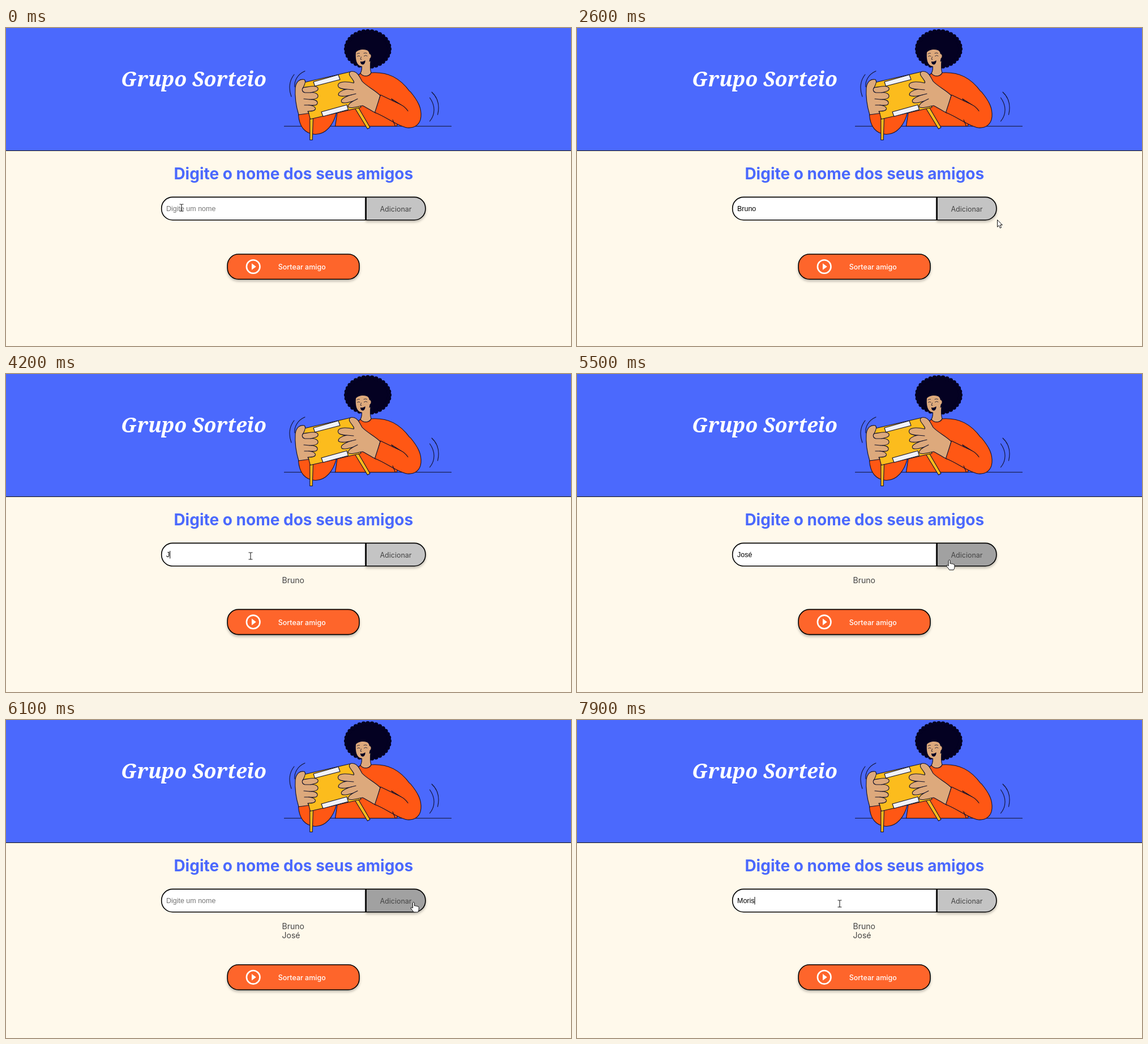
An HTML page for the animation above (8 s loop, 998 px wide and 561 px high).

```html
<!DOCTYPE html>
<html lang="pt-BR">
<head>
<meta charset="utf-8">
<title>Sorteio</title>
<style>
  html, body { margin: 0; width: 100%; height: 100%; overflow: hidden; background: #fff9eb; }
  svg { display: block; }
  text { font-family: Inter, sans-serif; font-size: 12.48px; white-space: pre; }
  .title { font: italic 700 35.7px "Noto Serif", serif; fill: #fff; }
  .heading { font-size: 28px; font-weight: 700; fill: #4b69fd; }
  .field { font-family: "Liberation Sans", Arial, sans-serif; }
  .item { font-size: 14.04px; fill: #444; }
  .box { stroke: #000; stroke-width: 1.6; }
  .raised { filter: drop-shadow(0 3px 2px rgba(0, 0, 0, .25)); }
  .ink { stroke: #10102a; stroke-width: 1.1; stroke-linejoin: round; stroke-linecap: round; }
  .line { fill: none; }
  .fine { stroke-width: .8; }
  .skin { fill: #dda97c; }
  .shirt { fill: #ff5714; }
  .wood { fill: #fcbc1d; }
  .paper { fill: #f1f2f8; }
  .hair { fill: #040122; }
</style>
</head>
<body>
<svg width="998" height="561" viewBox="0 0 998 561">
  <rect width="998" height="561" fill="#fff9eb"/>
  <rect width="998" height="216" fill="#4b69fd"/>
  <rect y="216" width="998" height="1" fill="#101010"/>
  <text class="title" x="203" y="103">Grupo Sorteio</text>

  <g class="ink">
    <path class="line" d="M491.500 173.300H786.500"/>
    <path class="line" d="M509 82C500 93 499 108 504 121M528 76C514 82 509 94 510 104"/>
    <path class="line" d="M752 113C764 124 766 138 762.500 153M748.500 123C758 136 759 152 748.500 164.500"/>
    <g id="hair" class="hair" stroke="none"></g>
    <path class="skin" d="M628 62C629 69 629 75 626 80C631 87 642 86 645 79C643 73 643 67 644 58Z"/>
    <path class="skin" stroke="none" d="M618 43C617 55 619 66 628 67.500C637 68 642 62 642.500 54C646 51 645 46 642 46C641 42 640 40 637 39C631 37 622 38 618 43Z"/>
    <path class="line fine" d="M620.500 50q2.500 -2 4.500 -.3M632.500 49.500q3 -2.500 5.500 -.2M620 45.500q2 -1.500 4.500 -1M632 44.500q3 -1.500 5.500 0M627.500 51l-1.500 4q1 1 2 .5"/>
    <path class="hair" stroke="none" d="M626 59C629 60 632 59 634.500 57C635 62 632 65 629.500 64.500C627 64 626 62 626 59Z"/>
    <path class="shirt" d="M626 80C631 87 642 86 645 79C675 77 696 88 714 113L690 173.300H581.500L591 110Z"/>
    <path class="shirt" d="M516.500 153C518 174 528 187 546 187.500C565 188 579 170 583.500 149L560 140L535 149Z"/>
    <path class="wood" d="M536.800 160V197.500H541.200L542.500 159ZM616.500 142L638.500 178L643 175.500L622 139.500Z"/>
    <path class="wood" d="M520.500 97.500L611.500 76.500L627 140L537.500 160.800Z"/>
    <path class="paper" d="M543 95L587 82.500L590 91L545.500 102.500ZM557 148L602 135.500L604.500 144L560 156Z"/>
    <path class="skin" d="M517 153C513 140 510 122 511 106C512 95 519 89 527 91C531 94 527 101 525 105C534 104 548 100 551 106C553 111 544 113 538 114C545 113 552 116 551 121C550 126 541 126 536 126C545 126 551 128 550 133C549 138 540 136 535 136C543 137 548 140 546 144C542 148 537 146 533 147L535 150.500Z"/>
    <path class="line" d="M525 105C522 108 523 113 528 114H538M526 125L536 126M527 136H535"/>
    <path class="skin" d="M661 119C651 109 637 103 629 94C625 87 622 79 615 77C608 75 604 79 608 85C613 92 616 95 614 97C603 94 590 94 587 99C584 106 594 108 602 108C594 109 584 115 588 119C593 122 602 120 610 118C600 121 589 126 593 131C597 134 606 131 613 129C606 133 602 138 606 140C612 142 622 138 630 137C640 142 647 147 653 150Z"/>
    <path class="line" d="M602 108L614 109M610 118L618 116M613 129L621 125"/>
    <path class="shirt" d="M714 112C729 130 734 142 733 156C732 170 722 177 709 176C691 173 674 158 651.500 149L661.500 118L697 135L681 125"/>
    <path class="line" d="M681 125L684 129M697 135C703 138 707 142 710 146.500M683 162L687.500 173"/>
  </g>

  <text class="heading" x="507.800" y="267.200" text-anchor="middle">Digite o nome dos seus amigos</text>

  <path class="box" fill="#fff" d="M635 298.400H294.300A19.600 19.600 0 0 0 274.700 318v1.200A19.600 19.600 0 0 0 294.300 338.800H635Z"/>
  <path id="add" class="box raised" d="M636.200 298.400H721.300A19.600 19.600 0 0 1 740.900 318v1.200A19.600 19.600 0 0 1 721.300 338.800H636.200Z"/>
  <text x="688.500" y="323.500" text-anchor="middle" fill="#444">Adicionar</text>
  <text id="field" class="field" x="283" y="322.500"></text>
  <rect id="caret" y="312" width="1" height="13.500"/>

  <text class="item" x="487.500" y="368.600">Bruno</text>
  <text class="item" x="487.500" y="385">José</text>

  <g id="draw">
    <rect class="box raised" x="391.200" y="399" width="232.800" height="44.200" rx="19.500" fill="#fe652b"/>
    <circle cx="436.700" cy="421" r="11.800" fill="none" stroke="#fff" stroke-width="2.600"/>
    <path fill="#fff" d="M434 415.200L441.800 421L434 426.800Z"/>
    <text x="522.700" y="426.300" text-anchor="middle" fill="#fff" font-weight="500">Sortear amigo</text>
  </g>

  <g id="pointer">
    <path id="beam" fill="none" stroke="#222" stroke-width="1.100" d="M-3.500 -6H-1Q0 -6 0 -5Q0 -6 1 -6H3.500M0 -5V5M-3.500 6H-1Q0 6 0 5Q0 6 1 6H3.500"/>
    <path id="arrow" fill="#fff" stroke="#111" d="M.5 .5V13L3.300 10.300L5.300 15L7.500 14L5.500 9.500H9.300Z"/>
    <path id="hand" fill="#fff" stroke="#111" d="M-1.500 11V1.500Q0 -1 1.500 1.500V7Q3 5.500 4.300 7.500Q6 6.300 7 8Q9 7.300 9.300 9.500V13Q9 16 7.500 18H0Q-1 15.500 -4.500 12Q-5.500 9 -3 9.500Z"/>
  </g>
</svg>
<script>
const LOOP = 8000, STEP = 100, ROW = 16.4;
const $ = id => document.getElementById(id);
const show = (el, on) => el.setAttribute('visibility', on ? 'visible' : 'hidden');

const typed = [
  [0, ''], [1000, 'B'], [1300, 'Br'], [1500, 'Bru'], [1600, 'Brun'], [1700, 'Bruno'],
  [2900, ''], [4200, 'J'], [4400, 'Jo'], [4800, 'Jos'], [4900, 'José'],
  [6100, ''], [7200, 'M'], [7600, 'Mor'], [7800, 'Mori'], [7900, 'Moris']
];
const caretOn = [[700, 2200], [3800, 5400], [7000, LOOP]];
const added = [2900, 6100];
const path = [
  [0, 310, 317], [1900, 310, 317], [2100, 430, 340], [2300, 645, 400], [2400, 752, 411],
  [2500, 753, 376], [2600, 742, 338], [2700, 716, 324], [2800, 702, 318], [2900, 702, 318],
  [3100, 560, 320], [3300, 432, 321], [5200, 432, 321], [5400, 590, 326], [5700, 793, 331],
  [5900, 756, 323], [6000, 730, 321], [6100, 720, 321], [6300, 560, 323], [6500, 464, 324],
  [LOOP, 464, 324]
];

function pointerAt(t) {
  const i = path.findIndex(p => p[0] > t);
  const [t0, x0, y0] = path[i - 1], [t1, x1, y1] = path[i];
  const k = (t - t0) / (t1 - t0);
  return [x0 + (x1 - x0) * k, y0 + (y1 - y0) * k];
}

function buildHair() {
  const ns = 'http://www.w3.org/2000/svg';
  const blob = (cx, cy, rx, ry) => {
    const e = document.createElementNS(ns, 'ellipse');
    Object.entries({ cx, cy, rx, ry }).forEach(([k, v]) => e.setAttribute(k, v));
    $('hair').append(e);
  };
  blob(639, 37, 39.5, 32.5);
  for (let i = 0; i < 32; i++) {
    const a = i / 32 * Math.PI * 2;
    blob(639 + 38 * Math.cos(a), 37 + 31 * Math.sin(a), 4, 4);
  }
}

function render(time) {
  const t = Math.floor(time % LOOP / STEP) * STEP;
  const text = typed.filter(s => s[0] <= t).pop()[1];
  const field = $('field');
  field.textContent = text || 'Digite um nome';
  field.setAttribute('fill', text ? '#000' : '#757575');
  $('caret').setAttribute('x', 283 + (text ? field.getComputedTextLength() : 0));
  show($('caret'), caretOn.some(([a, b]) => t >= a && t < b));

  const count = added.filter(a => t >= a).length;
  document.querySelectorAll('.item').forEach((el, i) => show(el, i < count));
  $('draw').setAttribute('transform', `translate(0 ${count * ROW})`);

  const [x, y] = pointerAt(t);
  const inRow = y > 298 && y < 339;
  const overField = inRow && x > 274 && x < 635;
  const overAdd = inRow && x >= 635 && x < 741;
  $('pointer').setAttribute('transform', `translate(${x} ${y})`);
  show($('beam'), overField);
  show($('hand'), overAdd);
  show($('arrow'), !overField && !overAdd);
  $('add').setAttribute('fill', overAdd ? '#a1a1a1' : '#c4c4c4');
}

buildHair();
const start = performance.now();
function tick() {
  render(performance.now() - start);
  requestAnimationFrame(tick);
}
tick();
</script>
</body>
</html>
```
